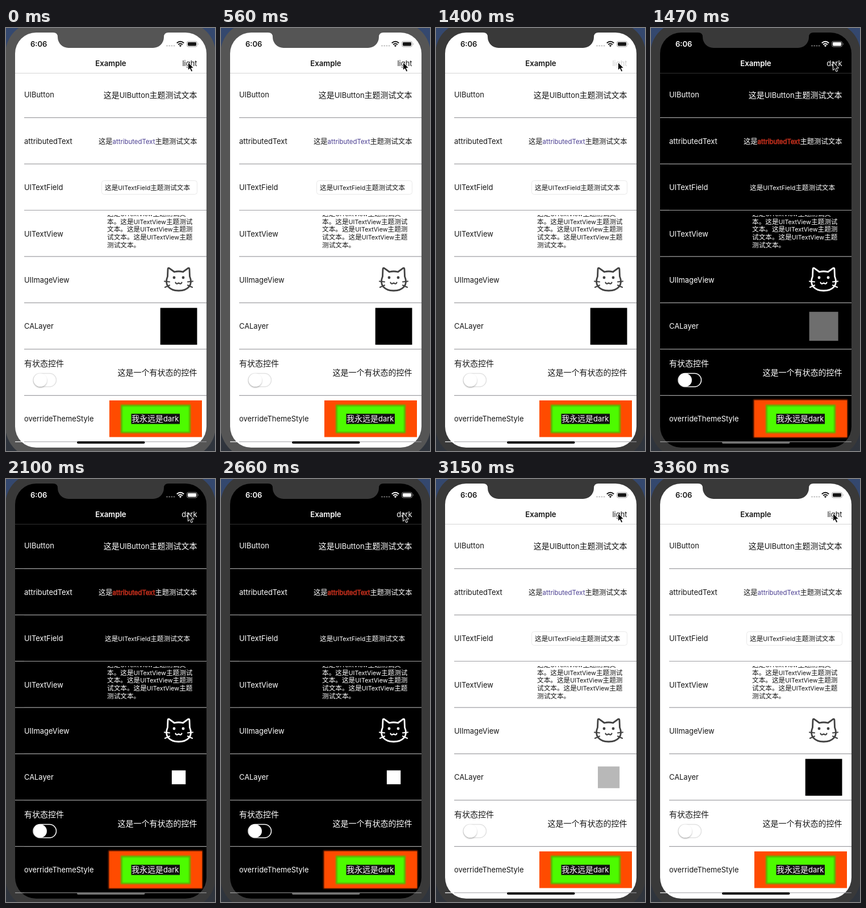
Write an HTML page that moves like this. It is 368 px wide and 744 px high and loops after 3500 ms.

```html
<!DOCTYPE html>
<html lang="zh-CN">
<head>
<meta charset="utf-8">
<title>Theme switching</title>
<style>
  html, body { margin: 0; width: 100%; height: 100%; overflow: hidden; background: #2b395f; }
  svg {
    display: block; width: 368px; height: 744px;
    --bg: #fff; --ink: #161616; --line: #a0a0a4; --inset: #fff; --navLine: #d6d6d6; --field: #e9e9e9;
    --accent: #4a3e91; --halo: none; --cat: #424242; --track: #e2e2e2; --home: #000;
    --dots: #c4c4c4; --battery: #a8a8a8; --glow: none; --bezel: #393939;
  }
  svg.dark {
    --bg: #000; --ink: #fff; --line: #a2a2a2; --inset: #a2a2a2; --navLine: #303030; --field: #000;
    --accent: #c5301d; --halo: #6e1a10; --cat: #fff; --track: #fff; --home: #737373;
    --dots: #666; --battery: #8c8c8c; --glow: #b83400;
  }
  svg.inactive { --bezel: #555; }
  text { font-family: Inter, "Noto Sans CJK SC", "Noto Sans CJK", sans-serif; fill: var(--ink); }
  .cjk { font-family: "Noto Sans CJK SC", "Noto Sans CJK", sans-serif; }
  .accent { fill: var(--accent); stroke: var(--halo); stroke-width: 1.2px; paint-order: stroke; }
  .ink { fill: var(--ink); }
  .stroke { fill: none; stroke: var(--ink); }
</style>
</head>
<body>
<svg id="stage" viewBox="0 0 368 744">
  <defs>
    <clipPath id="textClip"><rect x="170" y="329" width="170" height="66"/></clipPath>
    <filter id="shadow" x="-30%" y="-30%" width="160%" height="170%">
      <feDropShadow dx="0" dy="1.5" stdDeviation="1.2" flood-opacity=".3"/>
    </filter>
    <filter id="soft"><feGaussianBlur stdDeviation="1"/></filter>
    <linearGradient id="wallpaper" x2="0" y2="1">
      <stop stop-color="#34486f"/><stop offset="1" stop-color="#2f343c"/>
    </linearGradient>
  </defs>

  <rect width="368" height="744" fill="url(#wallpaper)"/>
  <rect x="-1" y="-10" width="370" height="766" rx="55" fill="var(--bezel)"/>
  <rect x="16" y="8" width="337" height="730" rx="37" fill="var(--bg)"/>
  <path d="M83 7H286V8Q278 8 278 16A19 19 0 0 1 259 35H110A19 19 0 0 1 91 16Q91 8 83 8Z" fill="var(--bezel)"/>

  <!-- status bar -->
  <g id="dots" fill="var(--dots)"></g>
  <g class="stroke" stroke-width="2">
    <path d="M300.8 26.6Q307 21 313.2 26.6M303.2 29.2Q307 25.8 310.8 29.2"/>
  </g>
  <path class="ink" d="M304.7 30.8Q307 29 309.3 30.8L307 33.2Z"/>
  <rect x="318.5" y="23.5" width="18" height="9.5" rx="2.6" fill="none" stroke="var(--battery)"/>
  <rect class="ink" x="320" y="25" width="15" height="6.5" rx="1.4"/>
  <path d="M338 26.5Q340 28.2 338 30Z" fill="var(--battery)"/>

  <path d="M16 79.5H353" stroke="var(--navLine)"/>
  <g id="separators" stroke-width="1.2"></g>
  <rect x="168.5" y="268.5" width="168" height="24" rx="4" fill="none" stroke="var(--field)"/>

  <!-- cat -->
  <g fill="none" stroke="var(--cat)" stroke-width="2.8" stroke-linecap="round" stroke-linejoin="round">
    <path d="M284.5 437L285 424.5Q285 421 288 422.8L296.5 429Q304 427 311.5 429L320 422.8Q323 421 323 424.5L323.5 437C330 452 320 462 304 462S278 452 284.5 437Z"/>
    <path d="M279 445.5L288 446.5M280 456L288 452.5M329 445.5L320 446.5M328 456L320 452.5" stroke-width="2.2"/>
    <path d="M298.5 447.5Q299.5 451.5 304 448.5Q308.5 451.5 309.5 447.5" stroke-width="2.2"/>
  </g>
  <g fill="var(--cat)"><circle cx="296" cy="439" r="2.4"/><circle cx="312" cy="439" r="2.4"/></g>

  <rect id="layer"/>

  <!-- switch -->
  <rect x="48" y="607.5" width="40.5" height="23.5" rx="11.75" fill="var(--bg)" stroke="var(--track)" stroke-width="1.5"/>
  <circle cx="60.3" cy="619.2" r="11.6" fill="#fff" filter="url(#shadow)"/>

  <!-- always-dark view -->
  <rect x="180.5" y="653.5" width="165.5" height="67" fill="var(--glow)" filter="url(#soft)"/>
  <rect x="182" y="655" width="163" height="64.5" fill="#ff4b00"/>
  <rect x="202" y="662.5" width="123" height="50" fill="#57b800" filter="url(#soft)"/>
  <rect x="205" y="665.5" width="117" height="44.5" fill="#4dfb00" filter="url(#soft)"/>
  <rect x="220.5" y="678.5" width="85.5" height="18" fill="#111"/>

  <g id="texts"></g>
  <rect x="125" y="727" width="119.5" height="4" rx="2" fill="var(--home)"/>
  <path d="M320.5 60.3V74.3L323.7 71.3L326.1 76.8L328.6 75.7L326.2 70.4H330.6Z" fill="#000" stroke="#fff"/>
</svg>
<script>
const stage = document.getElementById('stage');
const layer = document.getElementById('layer');
const texts = document.getElementById('texts');
const FRAME = 70, LOOP = 3500;
const ROW_HEIGHT = 81.45;
const LATIN_SCALE = 0.922;

function add(parent, tag, attrs) {
  const node = document.createElementNS(stage.namespaceURI, tag);
  for (const key in attrs) node.setAttribute(key, attrs[key]);
  parent.append(node);
  return node;
}

// Latin and Chinese runs use different sizes so their heights agree.
function label(content, x, y, size = 14, attrs = {}) {
  const node = add(texts, 'text', { x, y, ...attrs });
  for (const run of content.match(/[\x00-\x7f]+|[^\x00-\x7f]+/g)) {
    const latin = run.charCodeAt(0) < 128;
    const span = add(node, 'tspan', { 'font-size': latin ? size * LATIN_SCALE : size });
    if (!latin) span.setAttribute('class', 'cjk');
    else if (run !== content && run === 'attributedText') span.setAttribute('class', 'accent');
    span.textContent = run;
  }
  return node;
}

const END = { 'text-anchor': 'end' };

for (let i = 0; i < 4; i++)
  add(document.getElementById('dots'), 'circle', { cx: 283.5 + i * 4.2, cy: 31.3, r: 1.3 });
for (let i = 0; i < 8; i++) {
  const y = 157.6 + i * ROW_HEIGHT;
  const group = document.getElementById('separators');
  add(group, 'path', { d: `M16 ${y}H32`, stroke: 'var(--inset)' });
  add(group, 'path', { d: `M32 ${y}H353`, stroke: 'var(--line)' });
}

['UIButton', 'attributedText', 'UITextField', 'UITextView', 'UIImageView', 'CALayer', '', 'overrideThemeStyle']
  .forEach((name, row) => name && label(name, 32, 122.2 + row * ROW_HEIGHT));

label('6:06', 43, 32.8, 14.1, { 'font-weight': 600 });
label('Example', 184.5, 66.8, 14.3, { 'font-weight': 600, 'text-anchor': 'middle' });
label('这是UIButton主题测试文本', 336.5, 122.5, 14, END);
label('这是attributedText主题测试文本', 336.5, 203.6, 12.35, END);
label('这是UITextField主题测试文本', 174, 284.5, 11.65);
label('有状态控件', 32, 595);
label('这是一个有状态的控件', 336.5, 611, 14, END);
label('我永远是dark', 221, 692.3, 14, { style: 'fill:#fff' });

const textView = add(texts, 'g', { 'clip-path': 'url(#textClip)' });
['这是UITextView主题测试文', '本。这是UITextView主题测试', '文本。这是UITextView主题测',
 '试文本。这是UITextView主题', '测试文本。']
  .forEach((line, i) => textView.append(label(line, 178, 331 + i * 13.65, 11.65)));

const modeLabels = {
  light: label('light', 336.5, 66.5, 14, END),
  dark: label('dark', 336.5, 66.5, 14, END)
};

// cubic-bezier(.25, .1, .25, 1)
function ease(x) {
  if (x <= 0) return 0;
  if (x >= 1) return 1;
  const bezier = (a, b, s) => 3 * a * s * (1 - s) ** 2 + 3 * b * s * s * (1 - s) + s ** 3;
  let low = 0, high = 1;
  for (let i = 0; i < 20; i++) {
    const mid = (low + high) / 2;
    if (bezier(0.25, 0.25, mid) < x) low = mid; else high = mid;
  }
  return bezier(0.1, 1, low);
}

const TO_DARK = 1470, TO_LIGHT = 3150;
const morph = (t, start) => t < start ? 0 : ease((t - start + 55) / 250);

function draw(now) {
  const t = Math.floor(now % LOOP / FRAME) * FRAME;
  const dark = t >= TO_DARK && t < TO_LIGHT;
  const pressed = (t >= 1260 && t < TO_DARK) || (t >= 2940 && t < TO_LIGHT);
  stage.classList.toggle('dark', dark);
  stage.classList.toggle('inactive', t < 1050);

  for (const mode in modeLabels) {
    const node = modeLabels[mode];
    node.style.display = (mode === 'dark') === dark ? '' : 'none';
    node.style.opacity = pressed ? (dark ? 0.28 : 0.2) : 1;
  }

  const p = morph(t, TO_DARK) - morph(t, TO_LIGHT);
  const size = 64.8 - 40.4 * p;
  const gray = Math.round(255 * Math.max(p, 0) ** 0.78);
  layer.setAttribute('x', 304.1 - size / 2);
  layer.setAttribute('y', 524.7 - size / 2);
  layer.setAttribute('width', size);
  layer.setAttribute('height', size);
  layer.setAttribute('fill', `rgb(${gray},${gray},${gray})`);
}

const began = performance.now();
function tick() {
  draw(performance.now() - began);
  requestAnimationFrame(tick);
}
tick();
</script>
</body>
</html>
```
